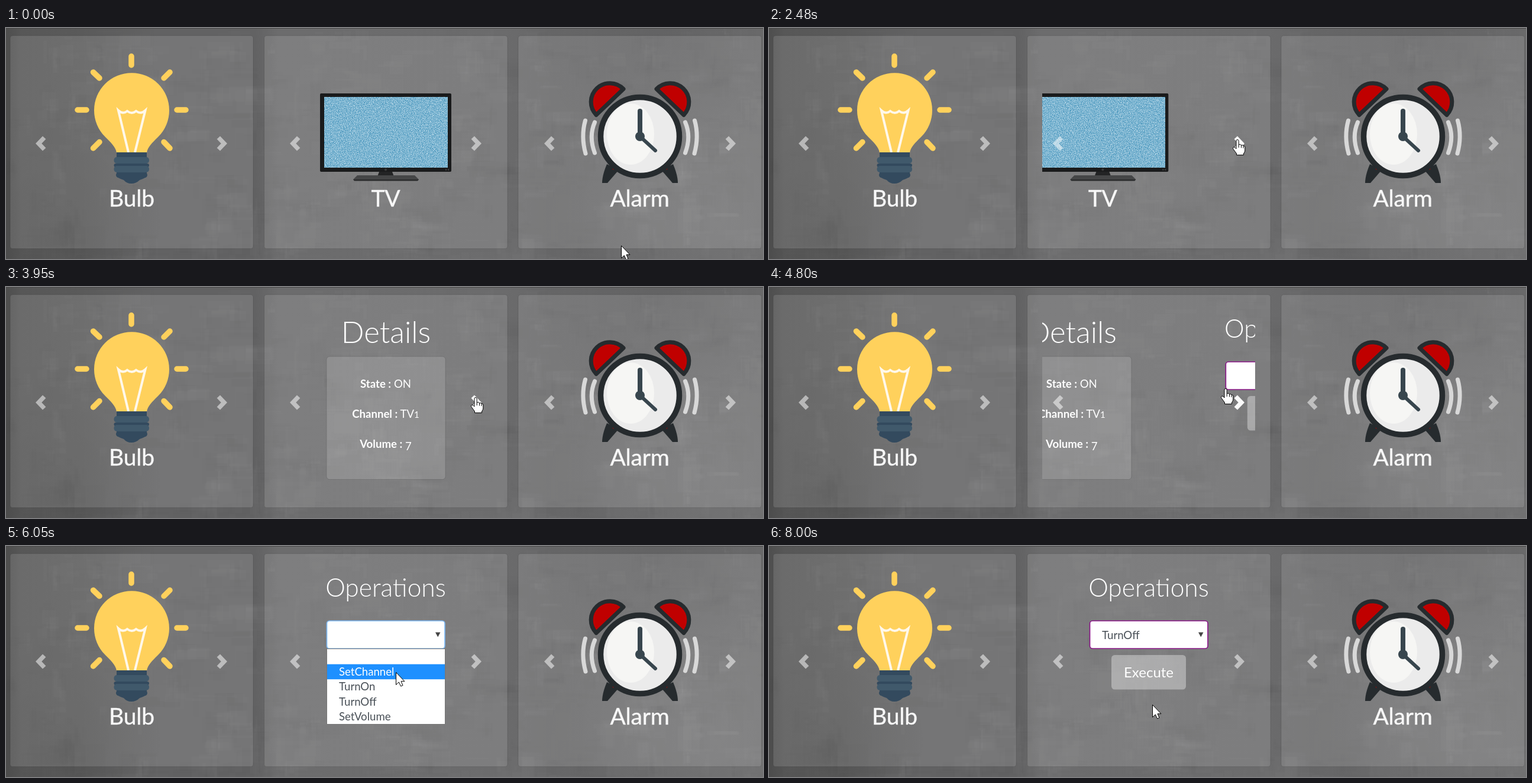
Write an HTML page with a canvas that moves like this. It is 1280 by 392 pixels and loops after 8070 ms.

```html
<!DOCTYPE html>
<html lang="en">
<head>
<meta charset="utf-8">
<title>Smart devices</title>
<style>
  html, body { margin: 0; width: 100%; height: 100%; overflow: hidden; background: #666; }
  canvas, svg { position: absolute; left: 0; top: 0; }
  text { font-family: Lato, "Open Sans", sans-serif; fill: #fff; text-anchor: middle; }
  .name { font-size: 39px; letter-spacing: -.2px; fill: #f8f8f8; stroke: #f8f8f8; stroke-width: .4px; }
  .title { font-weight: 300; }
  .info { font-size: 18.6px; }
  .info .key { font-weight: 700; }
  .pick { font-size: 18.6px; fill: #495057; text-anchor: start; }
  .chev { fill: none; stroke: #fff; stroke-width: 7.5; opacity: .52; }
  .chev.on { opacity: .97; }
</style>
</head>
<body>
<canvas id="wall" width="1280" height="392"></canvas>
<svg width="1280" height="392" viewBox="0 0 1280 392">
  <defs>
    <clipPath id="view"><rect x="462" y="13" width="360" height="361"/></clipPath>
    <clipPath id="face"><circle cx="1072" cy="184" r="61"/></clipPath>
    <filter id="static" x="0" y="0" width="1" height="1" color-interpolation-filters="sRGB">
      <feTurbulence type="fractalNoise" baseFrequency=".75" numOctaves="2" seed="4"/>
      <feColorMatrix values="1 0 0 0 -.01  .6 0 0 0 .41  .4 0 0 0 .62  0 0 0 0 1"/>
    </filter>
    <g id="alarmSide">
      <path d="M1016 231L1036 241 1017 263H1008Q1008 250 1016 231Z" fill="#262b2e"/>
      <circle cx="1027" cy="239" r="1.5" fill="#8a1010"/>
      <path d="M998 147.500A31.500 31.500 0 0 1 1044 103.500Z" fill="#c00000" stroke="#262b2e" stroke-width="7" stroke-linejoin="round"/>
      <path d="M979.500 157Q972 184 980 213M995.500 160Q985 184 995.500 212" fill="none" stroke="#d8d8d8" stroke-width="7" stroke-linecap="round"/>
    </g>
  </defs>

  <g id="cards" fill="#fff" fill-opacity=".12" stroke="#000" stroke-opacity=".13">
    <rect x="7" y="13" width="411" height="361.500" rx="4"/>
    <rect x="436.500" y="13" width="411.500" height="361.500" rx="4"/>
    <rect x="866" y="13" width="411.500" height="361.500" rx="4"/>
  </g>

  <g id="bulb">
    <path d="M212 48V63M121 139H136M289 139H304M147.500 75L158 85M277 75L267 85M158 193.500L147.500 204M267 193.500L277 204"
      stroke="#ffd15c" stroke-width="9.500" stroke-linecap="round"/>
    <path d="M187 212C186 202 176 193 167.500 184.500A63.500 63.500 0 1 1 257.500 184.500C249 193 239 202 238 212Z" fill="#ffd15c"/>
    <path d="M207 211L190 140Q197.500 147 205 141Q213 147 220 141Q228 147 235.500 140L218 211" fill="none" stroke="#fff8ea" stroke-width="4"/>
    <path d="M187 211H238V252Q235 255 226 258Q220 264 212 264Q204 264 199 258Q190 255 187 252Z" fill="#334a5e"/>
    <rect x="182.500" y="219" width="59.500" height="11" rx="5" fill="#40596b"/>
    <rect x="182.500" y="230" width="59.500" height="6" rx="3" fill="#334a5e"/>
    <rect x="182.500" y="234" width="59.500" height="11" rx="5" fill="#40596b"/>
    <rect x="186" y="245" width="53" height="9" rx="4.500" fill="#334a5e"/>
    <text class="name" x="212.500" y="302.500">Bulb</text>
  </g>

  <g id="alarm">
    <use href="#alarmSide"/>
    <use href="#alarmSide" transform="matrix(-1 0 0 1 2144 0)"/>
    <circle cx="1072" cy="184" r="66.500" fill="#ebebeb" stroke="#262b2e" stroke-width="9.500"/>
    <ellipse cx="1056" cy="180" rx="40" ry="52" fill="#f6f6f4" clip-path="url(#face)"/>
    <path d="M1072 184L1098 208" stroke="#38464e" stroke-width="6" stroke-linecap="round"/>
    <path d="M1072 184V141" stroke="#38464e" stroke-width="8" stroke-linecap="round"/>
    <circle cx="1072" cy="184" r="8" fill="#38464e"/>
    <text class="name" x="1071.500" y="302.500">Alarm</text>
  </g>

  <g clip-path="url(#view)">
    <g id="tv">
      <rect x="531" y="111" width="222" height="133" rx="2" fill="#1a1b1c"/>
      <rect x="538" y="117" width="209" height="120" fill="#7ab5d1" filter="url(#static)"/>
      <circle cx="642" cy="240.500" r="2" fill="#3a3a3a"/>
      <path d="M743 240.500h2m2 0h2" stroke="#4a4a4a" stroke-width="2"/>
      <path d="M631 244H653L656 252H628Z" fill="#232425"/>
      <path d="M594 250H691L698 257 696 259H589L587 257Z" fill="#454647"/>
      <path d="M587 257H698L696 259.500H589Z" fill="#2b2c2d"/>
      <text class="name" x="642" y="302.500">TV</text>
    </g>
    <g id="details">
      <text class="title" x="642.500" y="94.500" font-size="51">Details</text>
      <rect x="542" y="118" width="201" height="208.500" rx="5" fill="#fff" fill-opacity=".14" stroke="#000" stroke-opacity=".13"/>
      <text class="info" x="642" y="170.500"><tspan class="key">State :</tspan> ON</text>
      <text class="info" x="642" y="221.500"><tspan class="key">Channel :</tspan> TV<tspan font-size="15">1</tspan></text>
      <text class="info" x="642" y="272.500"><tspan class="key">Volume :</tspan> <tspan dy="4">7</tspan></text>
    </g>
    <g id="ops">
      <text class="title" x="642" y="86" font-size="42.500">Operations</text>
      <rect id="field" x="542.500" y="127" width="199.500" height="47" rx="4.500" fill="#fff" stroke-width="1.700"/>
      <text id="value" class="pick" x="563" y="158">TurnOff</text>
      <path d="M726 146.500H734.500L730.250 154.500Z" fill="#444"/>
      <rect id="run" x="579" y="185" width="126" height="58.500" rx="5.500" fill="#fff"/>
      <text x="642" y="223" font-size="24">Execute</text>
    </g>
  </g>

  <g id="arrows"></g>

  <g id="menu">
    <rect x="542.500" y="174.500" width="200" height="128" fill="#fff" stroke="#777"/>
    <rect id="mark" x="543" width="199" height="25.600" fill="#1e90ff"/>
  </g>

  <g id="pointer" fill="#fff" stroke="#000" stroke-linejoin="round">
    <path id="arrow" d="M.5 .5V21.500L5.300 17 8.600 24 12 22.500 9 15.700H15Z"/>
    <g id="hand">
      <path d="M-2 2.500Q-2 .5 0 .5T2.200 2.500V9Q6 7.500 6.500 10Q9.500 8.800 10 11.200Q12.800 10.400 12.800 13V19Q12.500 22 10.500 24V26.500H-1.500V24L-7 16.500Q-8.500 13.500-6 13Q-4 13-2 16Z"/>
      <path d="M2.200 9V14M6.500 10V14.500M10 11.500V15" fill="none"/>
    </g>
  </g>
</svg>

<script>
const LOOP = 8070, ROW = 25.6, MENU_TOP = 175;
const OPTIONS = ["", "SetChannel", "TurnOn", "TurnOff", "SetVolume"];
const PRESS_NEXT = 2200, OPEN_MENU = 5650, CLOSE_MENU = 6660, SET_VALUE = 6800, PRESS_RUN = 7480;

// Pointer path: time, x, y
const PATH = [
  [20, 1040, 369], [360, 851, 291], [440, 851, 291], [590, 843, 290], [990, 843, 290],
  [1610, 805, 206], [1840, 803, 189], [2090, 803, 189], [2160, 793, 185], [2310, 793, 185],
  [2860, 790, 199], [3090, 729, 177], [3320, 699, 166], [3430, 699, 166], [3950, 794, 187],
  [4340, 794, 187], [4410, 787, 172], [4700, 787, 172], [5190, 714, 172], [5600, 690, 155],
  [5700, 690, 155], [6210, 645, 240], [6440, 641, 264], [6750, 641, 264], [7440, 642, 204],
  [7510, 642, 202], [7640, 642, 202], [8000, 648, 269]
];

const $ = id => document.getElementById(id);
const put = (el, attrs) => { for (const k in attrs) el.setAttribute(k, attrs[k]); return el; };
const add = (parent, tag, attrs) =>
  parent.appendChild(put(document.createElementNS("http://www.w3.org/2000/svg", tag), attrs));
const show = (id, on) => { $(id).style.display = on ? "" : "none"; };

function paintWall() {
  const c = $("wall").getContext("2d");
  let seed = 7;
  const rnd = () => (seed = seed * 16807 % 2147483647) / 2147483647;
  const fill = (gradient, stops) => {
    stops.forEach(([at, colour]) => gradient.addColorStop(at, colour));
    c.fillStyle = gradient;
    c.fillRect(0, 0, 1280, 392);
  };
  const glow = (x, y, r, rgb, alpha) =>
    fill(c.createRadialGradient(x, y, 0, x, y, r), [[0, `rgba(${rgb},${alpha})`], [1, `rgba(${rgb},0)`]]);

  fill(c.createLinearGradient(0, 0, 1280, 0), [
    [0, "#4e4e4e"], [.02, "#575757"], [.1, "#5a5a5a"], [.2, "#626263"], [.33, "#626263"],
    [.36, "#6c6c6d"], [.66, "#6b6b6c"], [.72, "#666667"], [1, "#6a6a6b"]
  ]);
  glow(1190, 320, 280, "255,255,255", .07);
  glow(1110, 20, 220, "0,0,0", .05);
  glow(80, 330, 200, "0,0,0", .05);

  for (let i = 0; i < 420; i++) {
    c.fillStyle = `rgba(${rnd() < .5 ? "255,255,255" : "0,0,0"},${.004 + rnd() * .01})`;
    const x = rnd() * 1280, y = rnd() * 392, w = 8 + rnd() * 60, h = 6 + rnd() * 50;
    for (let j = 0; j < 6; j++)
      c.fillRect(x + rnd() * w, y + rnd() * h, w * rnd(), h * rnd());
  }
  c.fillStyle = "#484848";
  c.fillRect(0, 0, 1280, 1);
}

function chevron(x, dir) {
  return add($("arrows"), "path", { class: "chev", d: `M${x - 5.7 * dir} 186l${9.5 * dir} 10l${-9.5 * dir} 10` });
}

// Same curve as CSS ease-in-out
function ease(x) {
  if (x <= 0 || x >= 1) return x <= 0 ? 0 : 1;
  let lo = 0, hi = 1, u;
  for (let i = 0; i < 20; i++) {
    u = (lo + hi) / 2;
    if (1.26 * u * (1 - u) ** 2 + 1.74 * u * u * (1 - u) + u ** 3 < x) lo = u; else hi = u;
  }
  return u * u * (3 - 2 * u);
}

function pointerAt(t) {
  const i = PATH.findIndex(p => p[0] > t);
  if (i === 0) return PATH[0].slice(1);
  if (i < 0) return PATH[PATH.length - 1].slice(1);
  const [t0, x0, y0] = PATH[i - 1], [t1, x1, y1] = PATH[i], k = (t - t0) / (t1 - t0);
  return [x0 + (x1 - x0) * k, y0 + (y1 - y0) * k];
}

paintWall();
const [, , , tvNext, alarmPrev] = [[59, -1], [365, 1], [489, -1], [795, 1], [919, -1], [1225, 1]]
  .map(([x, dir]) => chevron(x, dir));
const labels = OPTIONS.map((name, i) => {
  const label = add($("menu"), "text", { class: "pick", x: 563, y: MENU_TOP + i * ROW + 19 });
  label.textContent = name;
  return label;
});

function draw(t) {
  const [x, y] = pointerAt(t);
  const inside = (l, r, top = 30, bottom = 350) => x >= l && x <= r && y >= top && y <= bottom;
  const open = t >= OPEN_MENU && t < CLOSE_MENU;

  const first = ease((t - 2288) / 600), second = ease((t - 4550) / 600);
  [["tv", 0], ["details", 1], ["ops", 2]].forEach(([id, n]) =>
    put($(id), { transform: `translate(${360 * (n - first - second)} 0)` }));

  const onNext = inside(768, 822), onPrev = inside(892, 946);
  const onRun = !open && t > CLOSE_MENU && inside(579, 705, 185, 243);
  tvNext.classList.toggle("on", onNext || t >= PRESS_NEXT && t < OPEN_MENU);
  alarmPrev.classList.toggle("on", onPrev);

  put($("field"), { stroke: t >= OPEN_MENU && t < PRESS_RUN ? "#7db8f5" : "#8a1688" });
  put($("run"), { "fill-opacity": onRun ? .5 : .35 });
  show("value", t >= SET_VALUE);

  show("menu", open);
  const row = y < MENU_TOP ? 0 : Math.min(4, Math.floor((y - MENU_TOP) / ROW));
  put($("mark"), { y: MENU_TOP + row * ROW });
  labels.forEach((label, i) => { label.style.fill = i === row ? "#fff" : ""; });

  const hand = onNext || onPrev || onRun;
  show("hand", hand);
  show("arrow", !hand);
  put($("pointer"), { transform: `translate(${Math.round(x)} ${Math.round(y)})` });
}

const start = performance.now();
(function tick() {
  draw((performance.now() - start) % LOOP);
  requestAnimationFrame(tick);
})();
</script>
</body>
</html>
```
